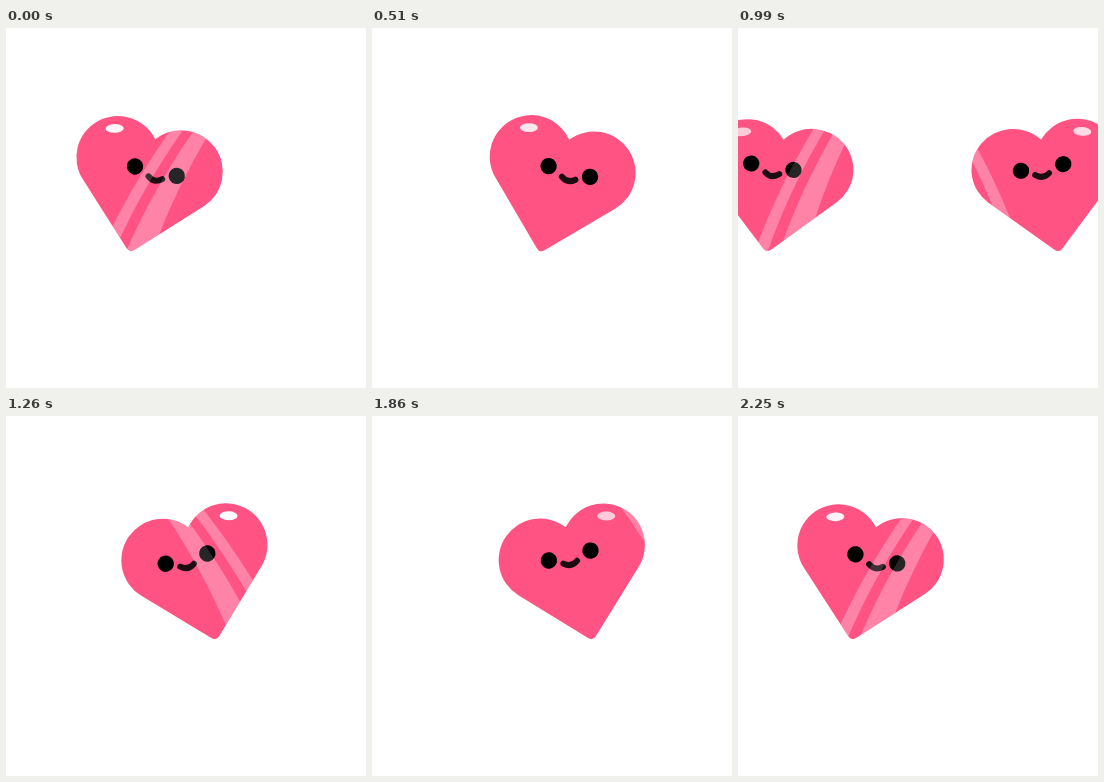
Recreate the animation shown at these times as an HTML page. Size 360 by 360 pixels, loop 2280 ms.

```html
<!DOCTYPE html>
<html lang="en">
<head>
<meta charset="utf-8">
<title>Two hearts</title>
<style>
html, body { margin: 0; width: 100%; height: 100%; overflow: hidden; background: #fff; }
svg { display: block; width: 100vw; height: 100vh; }
</style>
</head>
<body>
<svg viewBox="0 0 360 360">
  <defs>
    <path id="shape" d="M-4 -2.3L-61.85 -60.15A41.5 41.5 0 1 1 0 -115.3A41.5 41.5 0 1 1 61.85 -60.15L4 -2.3Q0 1.6 -4 -2.3Z"/>
    <clipPath id="clip"><use href="#shape"/></clipPath>
    <g id="face">
      <circle cx="-21.4" r="8.2"/>
      <circle cx="21.4" r="8.2"/>
      <path d="M-6 6.8Q1 12.4 8 6.4" fill="none" stroke="#1c0d12" stroke-width="6" stroke-linecap="round"/>
    </g>
  </defs>
</svg>
<script>
const LOOP = 2280, STEP = 30, PASS_END = 1065;
const svg = document.querySelector('svg');

const cube = v => Math.max(0, v) ** 3;

// A heart eases in from the side, lingers, then eases out the same way.
const tipX = t => 170 - 46 * cube((430 - t) / 430) - 33.5 * cube((t - 360) / 390);

// The light sweeps over the heart and returns.
const lightX = t => t < 480 ? 48 - 0.31 * t : -52 + 0.475 * (t - 750);

function set(el, attrs) {
  for (const k in attrs) el.setAttribute(k, attrs[k]);
}

function add(parent, name, attrs = {}) {
  const el = document.createElementNS('http://www.w3.org/2000/svg', name);
  set(el, attrs);
  parent.append(el);
  return el;
}

// Curved edge of a light band; x0 is its place near the top of the heart.
function edge(x0, lean) {
  const pts = [];
  for (let u = -30; u <= 130; u += 10) {
    const x = x0 - (lean - 0.001 * x0) * u + 0.0008 * u * u;
    pts.push(x.toFixed(2) + ' ' + (u - 123));
  }
  return pts;
}

function band(left, right, lean) {
  return 'M' + edge(left, 0.42).concat(edge(right, lean).reverse()).join('L') + 'Z';
}

function makeHeart(mirror) {
  const side = add(svg, 'g', mirror ? { transform: 'translate(360 0) scale(-1 1)' } : {});
  const root = add(side, 'g');
  add(root, 'use', { href: '#shape', fill: '#ff5384' });
  const clipped = add(root, 'g', { 'clip-path': 'url(#clip)' });
  const light = { fill: '#fff', 'fill-opacity': 0.15 };
  const under = add(clipped, 'path', light);
  const face = add(clipped, 'use', { href: '#face' });
  const over = add(clipped, 'path', light);
  const spot = add(root, 'ellipse', { rx: 9, ry: 4.4, fill: '#fff', transform: 'translate(-42 -117) rotate(-14)' });

  return t => {
    const x = tipX(t), tilt = 7.3 + 0.0435 * x;
    const stretch = Math.min(1, 0.975 + 0.00017 * x);
    set(root, {
      transform: `translate(${x} 223.4) rotate(${tilt}) scale(1 ${stretch})`,
      display: t < PASS_END ? 'inline' : 'none'
    });

    const lookX = 10 - 0.000033 * (t - 270) ** 2;
    const lookY = -86.3 + 2 * Math.cos(t / 90);
    set(face, { transform: `translate(${lookX} ${lookY})` });

    const lx = lightX(t);
    const d = band(lx - 37, lx - 26, 0.42) + band(lx - 16, lx, 0.36);
    set(under, { d });
    set(over, { d });
    set(spot, { 'fill-opacity': 1 - 0.3 * Math.min(1, ((t - 200) / 450) ** 2) });
  };
}

const first = makeHeart(false), second = makeHeart(true);

function draw(now) {
  const t = Math.floor((now % LOOP) / STEP) * STEP;
  first(t > 1200 ? t - LOOP : t);
  second((t - 1160) * 1.054);
}

const start = performance.now();
function tick() {
  draw(performance.now() - start);
  requestAnimationFrame(tick);
}
tick();
</script>
</body>
</html>
```
